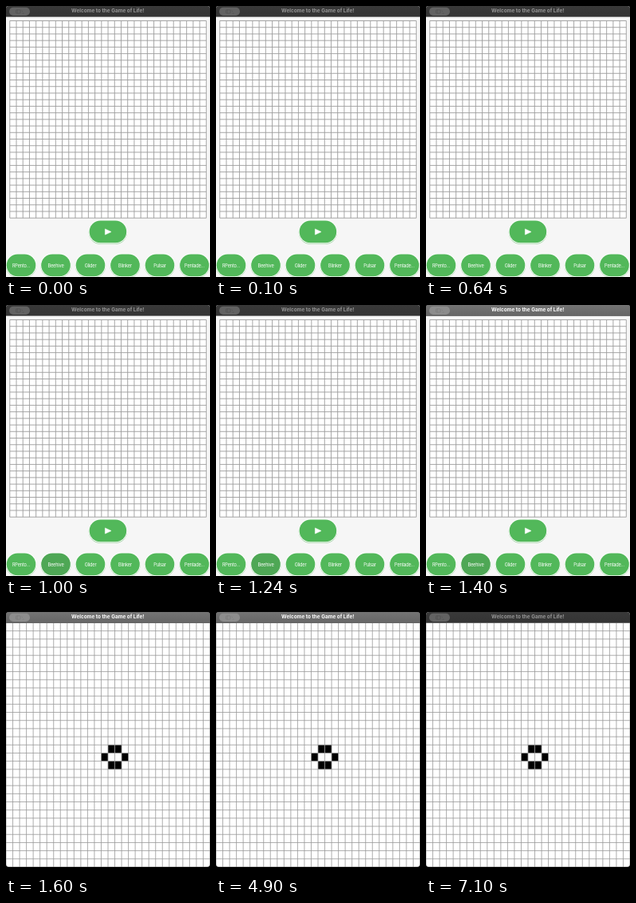
An HTML page that plays this animation: 256 px wide and 339 px high, repeating every 7300 ms.

```html
<!DOCTYPE html>
<html lang="en">
<head>
<meta charset="utf-8">
<title>Game of Life</title>
<style>
html, body { margin: 0; width: 100%; height: 100%; overflow: hidden; background: #000; }
svg { display: block; width: 100vw; height: 100vh; }
text { font-family: Inter, "Liberation Sans", sans-serif; text-anchor: middle; }
.title { font-size: 6.4px; font-weight: 700; }
.label { font-size: 5.7px; letter-spacing: -.21px; fill: #fff; }
.lines { fill: none; }
.icon { fill: none; stroke-width: .6; }
.menu, .board, .active, .pressed { animation: 7300ms step-end infinite; }
.menu { animation-name: menu; }
.board { animation-name: board; }
.active { animation-name: active; }
.pressed { animation-name: pressed; }
@keyframes menu { 0% { visibility: visible; } 21.9178%, 100% { visibility: hidden; } }
@keyframes board { 0% { visibility: hidden; } 21.9178%, 100% { visibility: visible; } }
@keyframes active { 0% { opacity: 0; } 19.1781% { opacity: 1; } 97.2603%, 100% { opacity: 0; } }
@keyframes pressed { 0% { fill: #52b85a; } 13.6986%, 100% { fill: #4ea755; } }
</style>
</head>
<body>
<svg viewBox="0 0 256 339" preserveAspectRatio="none">
  <defs>
    <linearGradient id="dim" x2="0" y2="1">
      <stop stop-color="#393939"/><stop offset="1" stop-color="#343434"/>
    </linearGradient>
    <linearGradient id="lit" x2="0" y2="1">
      <stop stop-color="#747474"/><stop offset="1" stop-color="#666"/>
    </linearGradient>
    <clipPath id="menuClip"><rect width="256" height="345" rx="3"/></clipPath>
    <clipPath id="boardClip"><rect y="10" width="256" height="319" rx="4"/></clipPath>
  </defs>

  <g class="menu">
    <g clip-path="url(#menuClip)">
      <rect width="256" height="339" fill="#f6f6f6"/>
      <g id="menuBar"></g>
      <rect x="4.8" y="18.5" width="246.5" height="246.7" fill="#fff"/>
      <path class="lines" id="menuGrid" stroke="#9c9c9c" stroke-width=".9"/>
      <g id="buttons"></g>
      <path d="M124.4 278.9L132 282.5L124.4 286.1Z" fill="#fff" stroke="#fff" stroke-width=".6" stroke-linejoin="round"/>
    </g>
  </g>

  <g class="board">
    <g clip-path="url(#boardClip)">
      <rect y="10" width="256" height="319" fill="#fff"/>
      <g id="cells"></g>
      <path class="lines" id="boardGrid" stroke="#999" stroke-width=".8"/>
      <g id="boardBar" transform="translate(0 10)"></g>
    </g>
  </g>
</svg>
<script>
const $ = id => document.getElementById(id);
const SIZE = 30;
const TOP = 23.5, CELL_W = 256 / SIZE, CELL_H = (329 - TOP) / SIZE;

function grid(id, x, y, w, h) {
  let d = '';
  for (let i = 0; i <= SIZE; i++) {
    d += `M${x + w * i / SIZE} ${y}v${h}M${x} ${y + h * i / SIZE}h${w}`;
  }
  $(id).setAttribute('d', d);
}

function barFace(fill, pill, icon, text) {
  return `<rect width="256" height="13.6" fill="url(#${fill})"/>
    <rect x="4" y="1.8" width="26" height="10.2" rx="5.1" fill="${pill}"/>
    <g class="icon" stroke="${icon}">
      <rect x="12.5" y="4.8" width="5.5" height="4.4" rx=".8"/>
      <path d="M14.3 4.8v4.4M19.6 5.5l1.4 1.4M20.6 9.2h2"/>
    </g>
    <text class="title" x="127.8" y="8.4" fill="${text}">Welcome to the Game of Life!</text>`;
}

function button(cx, cy, w, label = '', cls = '') {
  const pill = (grow, dy, attrs) =>
    `<rect x="${cx - w / 2 - grow}" y="${cy - 13.9 - grow + dy}" width="${w + 2 * grow}"
      height="${27.8 + 2 * grow}" rx="${13.9 + grow}" ${attrs}/>`;
  return pill(.9, .8, 'fill="#a9d5ac"') + pill(.9, 0, 'fill="#fff"') +
    pill(0, 0, `fill="#52b85a" class="${cls}"`) +
    `<text class="label" x="${cx}" y="${cy + 2.4}">${label}</text>`;
}

const bar = barFace('dim', '#626262', '#4d4d4d', '#969696') +
  `<g class="active">${barFace('lit', '#8c8c8c', '#777', '#fff')}</g>`;
$('menuBar').innerHTML = $('boardBar').innerHTML = bar;

grid('menuGrid', 4.8, 18.5, 246.5, 246.7);
grid('boardGrid', 0, TOP, 256, 329 - TOP);

const names = ['RPento...', 'Beehive', 'Glider', 'Blinker', 'Pulsar', 'Pentade...'];
$('buttons').innerHTML = button(127.9, 282.4, 46.6) + names.map((name, i) =>
  button(19 + 43.5 * i, 324.3, 36.6, name, name === 'Beehive' ? 'pressed' : '')).join('');

const hive = [[15, 15], [16, 15], [14, 16], [17, 16], [15, 17], [16, 17]];
$('cells').innerHTML = hive.map(([c, r]) =>
  `<rect x="${c * CELL_W}" y="${TOP + r * CELL_H}" width="${CELL_W}" height="${CELL_H}"/>`).join('');
</script>
</body>
</html>
```
